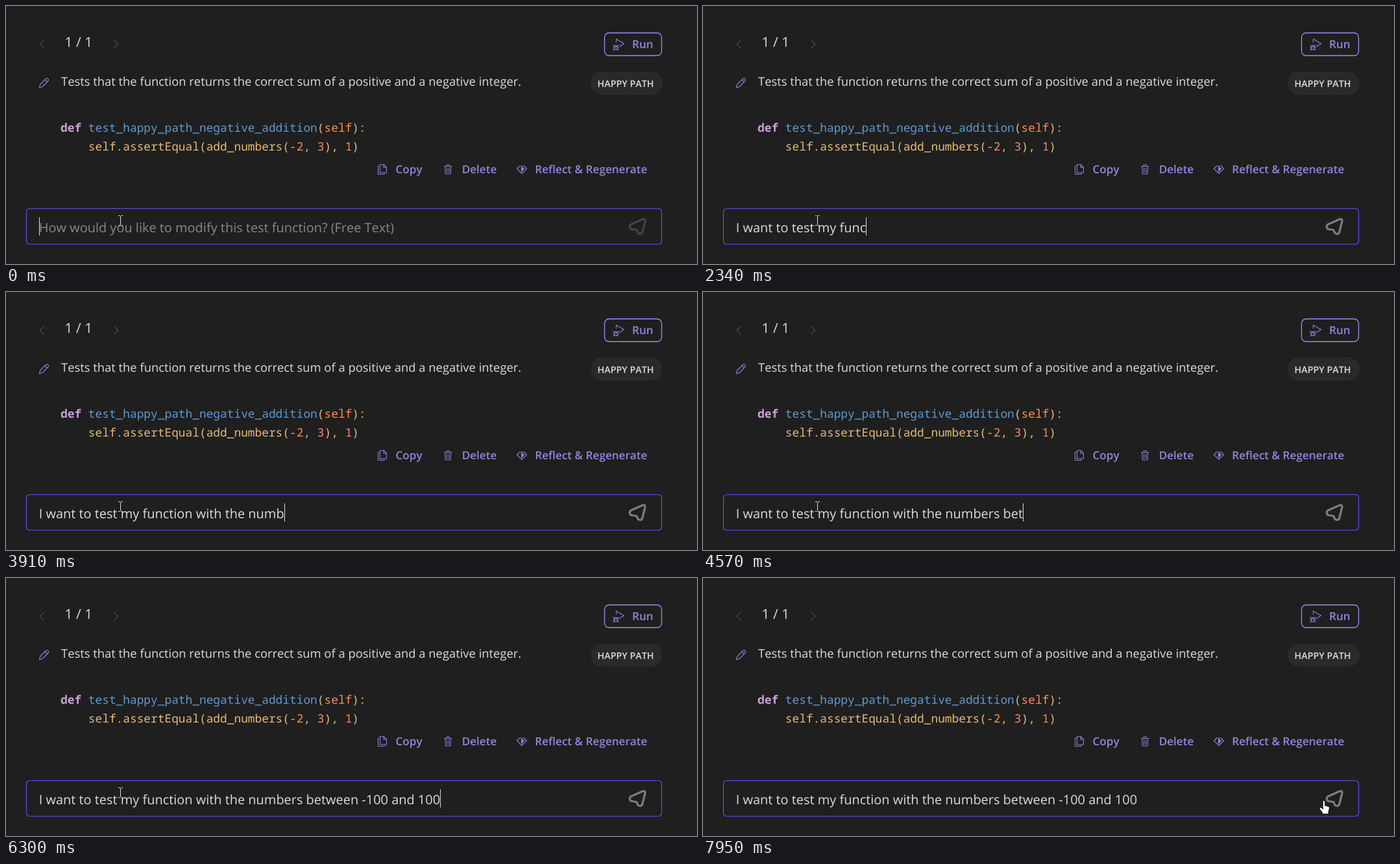
An HTML page for the animation above (7990 ms loop, 1065 px wide and 398 px high).

```html
<!DOCTYPE html>
<html lang="en">
<head>
<meta charset="utf-8">
<title>Modify test</title>
<style>
  html, body { margin: 0; width: 100%; height: 100%; overflow: hidden; background: #1f1f1f; }
  svg { display: block; }
  text {
    font: 20px "Open Sans", "Noto Sans", sans-serif;
    font-kerning: none;
    text-rendering: geometricPrecision;
    white-space: pre;
    fill: #dcdcdc;
  }
  .input { font-size: 19.95px; }
  .link { font-size: 17.1px; font-weight: 600; fill: #9385de; }
  .code { font: 500 17.83px "Noto Sans Mono", "DejaVu Sans Mono", monospace; fill: #e6ba76; font-variant-ligatures: none; }
  .def { fill: #cda2dc; font-weight: 600; }
  .name { fill: #5f9ad2; }
  .arg { fill: #ff8d58; }
  .icon { fill: none; stroke: #8f80d8; stroke-width: 1.1; stroke-linejoin: round; stroke-linecap: round; }
</style>
</head>
<body>
<svg width="1065" height="398" viewBox="0 0 1065 398">
  <g class="icon" style="stroke:#4b4760">
    <path d="M58 53.500l-6 5.500 6 6"/>
    <path d="M167 53.500l6 5.500-6 6"/>
  </g>
  <text x="90.500" y="63" style="font-size:21px">1 / 1</text>

  <rect x="922.500" y="41.500" width="88" height="35" rx="7" class="icon" style="stroke:#a18bf5;stroke-width:1.300"/>
  <g class="icon">
    <path d="M940.500 56v-5l12 7-7 4.500"/>
    <ellipse cx="940" cy="64.300" rx="2.400" ry="3.200"/>
    <path d="M938 63h4M937.500 61.500l-2-1M942.500 61.500l2-1M937.500 64.500h-2M942.500 64.500h2M938 66.500l-2 1.500M942 66.500l2 1.500"/>
  </g>
  <text x="965" y="65" class="link">Run</text>

  <path class="icon" d="M51.500 126l1.200-5 9-9q1.800-1.200 3.200.3t.2 3.200l-9 9zM60 113.700l3.500 3.500"/>
  <text x="85" y="123" style="font-size:18.400px">Tests that the function returns the correct sum of a positive and a negative integer.</text>
  <rect x="901" y="101" width="111" height="36" rx="18" fill="#2a2a2a"/>
  <text x="911.500" y="124.500" style="font-size:14.300px;font-weight:600">HAPPY PATH</text>

  <text x="84" y="194" class="code"><tspan class="def">def</tspan> <tspan class="name">test_happy_path_negative_addition</tspan>(<tspan class="arg">self</tspan>):</text>
  <text x="126.800" y="223" class="code">self.assertEqual(add_numbers(<tspan class="arg">-2</tspan>, <tspan class="arg">3</tspan>), <tspan class="arg">1</tspan>)</text>

  <g class="icon">
    <path d="M576.500 244.500h5.500l4.500 4.500v8h-10zM582 244.500v4.500h4.500M575 247h-1.500v12.500h9.500v-1.500"/>
    <path d="M675.500 247.500h11.500M679.200 247.500v-2.500h4v2.500M676.800 247.500l.7 11.500h7.500l.7-11.500M679.800 250v6.500M682.700 250v6.500"/>
    <path d="M787.500 251l4-4h7l4 4-7.500 7.500z"/>
    <path d="M794.500 248.500l4 2.500-4 4.500z" fill="#8f80d8"/>
  </g>
  <text x="600.500" y="258" class="link">Copy</text>
  <text x="702.700" y="258" class="link">Delete</text>
  <text x="815.300" y="258" class="link">Reflect &amp; Regenerate</text>

  <rect x="31.500" y="312.500" width="979" height="55" rx="5" fill="none" stroke="#5f4df0" stroke-width="1.200"/>
  <text id="hint" class="input" x="50.700" y="349" style="fill:#888">How would you like to modify this test function? (Free Text)</text>
  <text id="typed" class="input" x="50.700" y="349" xml:space="preserve"></text>
  <rect id="caret" y="326" width="1" height="28" fill="#dcdcdc"/>
  <path id="send" fill="none" stroke-width="3.200" stroke-linejoin="round"
    d="M963 337L981 329Q985.500 327.500 985 332L981 348Q980 352 976.500 351.500Q973.500 351 973 348Q972.500 345 969 345L965 344.500Q961.500 344 961.300 341Q961.300 338 963 337Z"/>

  <path id="beam" fill="none" stroke="#e0e0e0" d="M-3-7.500h2.500l1 1 1-1H4M.5-6.500v13M-3 7.500h2.500l1-1 1 1H4"/>
  <path id="hand" fill="#fff" stroke="#1a1a1a" stroke-linejoin="round"
    d="M-1.700 1.500Q0-.8 1.700 1.500V8L7 9.500Q8.700 10 8.300 12.500L7 18V21H-2L-3 18-6.500 13.500Q-7.500 10.500-4.500 11L-1.700 13.500Z"/>
</svg>
<script>
  const LOOP = 7990, BLINK = 330;
  const MESSAGE = "I want to test my function with the numbers between -100 and 100";
  // Bursts of typing: first key, last key, number of keys
  const BURSTS = [
    [430, 660, 4], [810, 1170, 6], [1350, 1600, 5], [1740, 1740, 1], [1890, 1930, 2],
    [2080, 2340, 4], [2480, 3180, 10], [3290, 3660, 6], [3800, 3910, 2], [3950, 4140, 4],
    [4320, 4930, 8], [5290, 5650, 5], [5790, 6300, 7]
  ];
  const keyTimes = BURSTS.flatMap(([from, to, count]) =>
    Array.from({ length: count }, (_, i) => from + (to - from) * i / Math.max(1, count - 1)));
  const firstKey = keyTimes[0], lastKey = keyTimes[keyTimes.length - 1];

  // Pointer path: time, x, y
  const PATH = [
    [6870, 176, 331], [7000, 235, 331], [7390, 673, 337],
    [7710, 900, 346], [7870, 948, 345], [7950, 957, 343]
  ];

  const [hint, typed, caret, send, beam, hand] =
    ["hint", "typed", "caret", "send", "beam", "hand"].map(id => document.getElementById(id));
  const show = (el, on) => el.setAttribute("visibility", on ? "visible" : "hidden");
  const clamp = v => Math.min(1, Math.max(0, v));

  function pointerAt(time) {
    const t = 7390 + Math.floor((time - 7390) / 40) * 40;
    let i = 1;
    while (i < PATH.length - 1 && PATH[i][0] < t) i++;
    const a = PATH[i - 1], b = PATH[i], k = clamp((t - a[0]) / (b[0] - a[0]));
    return [1, 2].map(j => Math.round(a[j] + (b[j] - a[j]) * k));
  }

  function draw(t) {
    const count = keyTimes.filter(k => k <= t).length;
    typed.textContent = MESSAGE.slice(0, count);
    show(hint, !count);

    const caretOn = !count ? t < 180
      : count < MESSAGE.length || Math.floor((t - lastKey) / BLINK) % 2 === 0;
    show(caret, caretOn);
    caret.setAttribute("x", count ? Math.round(50.7 + typed.getComputedTextLength()) : 51);

    const grey = Math.round(68 + 56 * clamp((t - firstKey) / 170));
    send.setAttribute("stroke", `rgb(${grey},${grey},${grey})`);

    const [x, y] = pointerAt(t), overSend = x > 940;
    show(beam, !overSend);
    show(hand, overSend);
    (overSend ? hand : beam).setAttribute("transform", `translate(${x} ${y})`);
  }

  const start = performance.now();
  function tick() {
    draw((performance.now() - start) % LOOP);
    requestAnimationFrame(tick);
  }
  tick();
</script>
</body>
</html>
```
